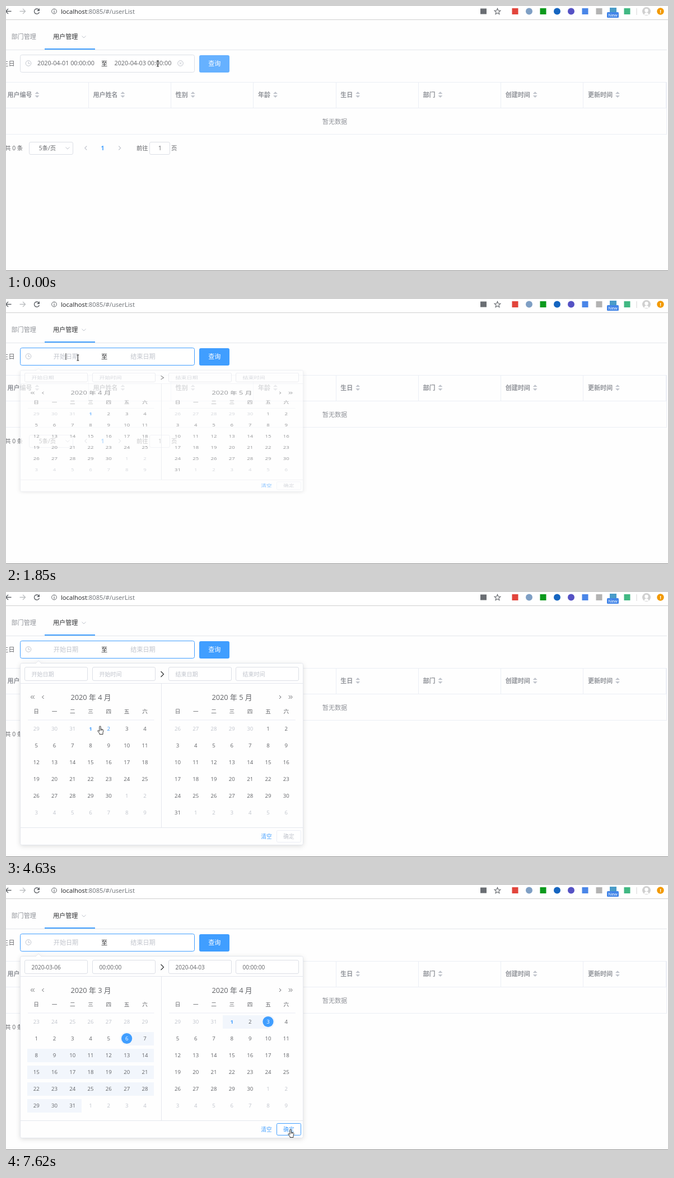
Animation, 1182 px wide and 474 px high, one loop 8 s. Source, as an HTML page:

```html
<!DOCTYPE html>
<html lang="zh-CN">
<head>
<meta charset="utf-8">
<title>用户管理</title>
<style>
  html, body { margin: 0; width: 100%; height: 100%; overflow: hidden; background: #fefefe; }
  svg { display: block; width: 1182px; height: 474px; }
  text { font-family: "Open Sans", "Noto Sans CJK SC", "Noto Sans CJK", sans-serif; white-space: pre; }
  .popup { filter: drop-shadow(0 2px 4px rgba(0, 0, 0, .12)); }
</style>
</head>
<body>
<svg viewBox="0 0 1182 474">
  <g id="page"></g>
  <g id="live"></g>
</svg>
<script>
const LOOP = 8000;
const BLUE = '#409eff', INK = '#303133', TEXT = '#606266', MUTED = '#909399',
      PALE = '#c0c4cc', EDGE = '#dcdfe6', LINE = '#ebeef5', RANGE = '#f2f6fc', WHITE = '#fefefe';

// Moments of user actions, ms
const CLEAR = 650, OPEN = 1700, PREV_MONTH = 5280, PICK_START = 6200, PICK_END = 7080;

// Screen refreshes: [first, last, count]
const runs = [[0, 0, 1], [120, 1050, 8], [1170, 1550, 4], [1700, 2120, 4], [2270, 2960, 6],
  [3080, 3200, 2], [3350, 4200, 7], [4630, 5450, 6], [5600, 5600, 1], [5750, 6690, 7],
  [6810, 6810, 1], [7080, 7620, 5]];
const refreshes = runs.flatMap(([a, b, n]) =>
  Array.from({ length: n }, (_, i) => n > 1 ? a + (b - a) * i / (n - 1) : a));

// Pointer path: [ms, x, y]
const path = [[0, 271, 103], [120, 285, 103], [380, 311, 103], [CLEAR, 311, 103], [1050, 235, 104],
  [1550, 153, 105], [1700, 130, 104], [2120, 125, 107], [2270, 135, 130], [2500, 185, 200],
  [2822, 250, 246], [2960, 276, 243], [3080, 281, 252], [3200, 270, 256], [3350, 262, 268],
  [3650, 235, 282], [3900, 195, 270], [4200, 168, 240], [4630, 168, 240], [5122, 66, 189],
  [5300, 66, 189], [5450, 81, 196], [5600, 100, 215], [5907, 180, 268], [6063, 214, 283],
  [6220, 215, 282], [6377, 300, 270], [6533, 400, 252], [6690, 461, 248], [6810, 468, 247],
  [7080, 468, 247], [7480, 504, 415], [7620, 508, 437]];

function pointerAt(t) {
  const i = path.findIndex(p => p[0] > t);
  if (i < 0) return path[path.length - 1].slice(1);
  if (i === 0) return path[0].slice(1);
  const [a, x, y] = path[i - 1], [b, u, v] = path[i], k = (t - a) / (b - a);
  return [x + (u - x) * k, y + (v - y) * k];
}

// Drawing helpers; text is placed by its vertical centre
const text = (x, y, s, size, fill, anchor = 'middle', weight = 400) =>
  `<text x="${x}" y="${y + size * .37}" font-size="${size}" fill="${fill}" text-anchor="${anchor}" font-weight="${weight}">${s}</text>`;
const label = (x, y, s, size, fill, weight) => text(x, y, s, size, fill, 'start', weight);
const rect = (x, y, w, h, fill, stroke = 'none', r = 0) =>
  `<rect x="${x}" y="${y}" width="${w}" height="${h}" rx="${r}" fill="${fill}" stroke="${stroke}"/>`;
const circle = (x, y, r, fill, stroke = 'none') =>
  `<circle cx="${x}" cy="${y}" r="${r}" fill="${fill}" stroke="${stroke}"/>`;
const stroke = (d, color, width = 1, fill = 'none') =>
  `<path d="${d}" fill="${fill}" stroke="${color}" stroke-width="${width}"/>`;
const chevron = (x, y, dir, color, size = 3, width = 1) =>
  stroke(`M${x - dir * size / 2} ${y - size}l${dir * size} ${size}l${-dir * size} ${size}`, color, width);
const chevronDown = (x, y) => stroke(`M${x - 3.5} ${y - 1.5}l3.5 3.5 3.5-3.5`, PALE);

function browserBar() {
  const badges = [[909, '#e2453c', 0], [934, '#7f9fc4', 1], [959, '#0b9a1c', 0], [984, '#1565c0', 1],
    [1009, '#5552c4', 1], [1034, '#4a86e8', 0], [1059, '#b3b3b3', 0], [1109, '#41b883', 0]];
  return rect(0, 0, 1182, 24, '#fff') + rect(0, 24, 1182, 1, '#d0d0d0') +
    stroke('M9.5 9.5H0M4 5L-.5 9.5L4 14', '#5f6368', 1.3) +
    stroke('M24.5 9.5H34M30 5l4.5 4.5L30 14', '#bcbec1', 1.3) +
    stroke('M58.5 6.5A4.6 4.6 0 1 0 59.4 11', '#5f6368', 1.4) +
    '<path d="M60 4v5h-5z" fill="#5f6368"/>' +
    circle(86, 9.5, 4.4, 'none', '#5f6368') + rect(85.4, 9, 1.2, 3.2, '#5f6368') + rect(85.4, 6.8, 1.2, 1.2, '#5f6368') +
    label(98, 9.5, 'localhost<tspan fill="#6b6f74">:8085/#/userList</tspan>', 11.2, '#202124') +
    rect(847, 4.5, 11, 10, '#6a6e73') +
    stroke('M877.5 4.5l1.5 3.5 3.9.3-3 2.5 1 3.8-3.4-2-3.4 2 1-3.8-3-2.5 3.9-.3z', '#5f6368', 1.1) +
    badges.map(([x, c, round]) => round ? circle(x, 9.5, 6, c) : rect(x - 5.5, 4, 11, 11, c)).join('') +
    rect(1078, 3, 12, 8, '#4a9cc8') + rect(1073, 11, 21, 10, '#4285e8', 'none', 1.5) +
    text(1083.5, 16, 'New', 8, '#fff') +
    rect(1125.5, 4, 1, 12, '#d5d5d5') +
    circle(1143.5, 9.5, 7.5, '#d0d0d0') + circle(1143.5, 8, 3.2, '#fff') +
    '<path d="M1139.5 16c0-6 8-6 8 0z" fill="#fff"/>' +
    circle(1168.5, 9.5, 6.2, '#f29900') + text(1168.5, 9.5, '!', 9.5, '#fff', 'middle', 700);
}

function table() {
  const names = ['用户编号', '用户姓名', '性别', '年龄', '生日', '部门', '创建时间', '更新时间'];
  const heads = names.map((name, i) => {
    const x = i ? 8.2 + i * 147.25 : 2.5, mid = x + name.length * 11 + 9;
    return label(x, 158.5, name, 11, MUTED, 700) +
      `<path d="M${mid - 4} 157.3l4-4 4 4zM${mid - 4} 160l4 4 4-4z" fill="${PALE}"/>` +
      rect(Math.floor(147.25 * (i + 1)), 136, 1, 46, LINE);
  }).join('');
  return [136, 182, 229].map(y => rect(0, y, 1180, 1, LINE)).join('') + heads +
    rect(1179, 136, 1, 94, LINE) + text(587, 206.5, '暂无数据', 11.1, MUTED);
}

function pagination() {
  return text(30, 254.5, '共 0 条', 10.3, TEXT, 'end') +
    rect(41.5, 243.5, 78, 22, '#fff', EDGE, 2.5) + text(74, 254.5, '5条/页', 10.3, TEXT) + chevronDown(110, 254) +
    chevron(142.5, 254, -1, PALE, 3.5, 1.1) + text(172.5, 254.5, '1', 10.3, BLUE, 'middle', 700) +
    chevron(203, 254, 1, PALE, 3.5, 1.1) + label(233, 254.5, '前往', 10.3, TEXT) +
    rect(256.5, 243.5, 36, 22, '#fff', EDGE, 2.5) + text(275, 254.5, '1', 10.3, TEXT) +
    label(295, 254.5, '页', 10.3, TEXT);
}

document.getElementById('page').innerHTML = browserBar() +
  label(9.5, 55, '部门管理', 11.1, MUTED) + label(84, 55, '用户管理', 11.1, INK) + chevronDown(139, 55) +
  rect(0, 78, 1180, 1, '#e4e6ea') + rect(69, 76, 90, 2, BLUE) +
  text(15.5, 103, '生日', 11.1, TEXT, 'end') +
  table() + pagination() + rect(0, 473, 1182, 1, '#8c8c8c');

// Calendar
const DAY = 864e5, CELL = 32.3, PANEL = 252.3, GRID_X = 38, GRID_Y = 229.5, ROW = 30;
const dayOf = (month, d) => Date.UTC(2020, month, d) / DAY;
const leftMonth = t => t < PREV_MONTH ? 3 : 2;
const TODAY = dayOf(3, 1), START = dayOf(2, 6), END = dayOf(3, 3);

function gridStart(month) {
  const first = dayOf(month, 1);
  return first - (new Date(first * DAY).getUTCDay() || 7);
}
const isIn = (day, month) => new Date(day * DAY).getUTCMonth() === month;

function dayUnder([x, y], t) {
  const panel = x < 278 ? 0 : 1;
  const col = Math.floor((x - GRID_X - panel * PANEL) / CELL), row = Math.floor((y - GRID_Y) / ROW);
  if (t < OPEN || col < 0 || col > 6 || row < 0 || row > 5) return null;
  const month = leftMonth(t) + panel, day = gridStart(month) + row * 7 + col;
  return { day, month, active: isIn(day, month) };
}

function panelView(index, month, sel, hover) {
  const x0 = GRID_X + index * PANEL + CELL / 2, first = gridStart(month);
  let bands = '', days = '';
  for (let i = 0; i < 42; i++) {
    const day = first + i, x = x0 + i % 7 * CELL, y = 244.5 + Math.floor(i / 7) * ROW;
    const active = isIn(day, month), num = new Date(day * DAY).getUTCDate();
    let color = active ? TEXT : PALE, weight = 400;
    if (active && sel && day >= sel[0] && day <= sel[1]) {
      const isStart = day === sel[0], isEnd = day === sel[1];
      const left = isStart ? x : x - CELL / 2, right = isEnd ? x : x + CELL / 2;
      bands += rect(left, y - 12, right - left, 24, RANGE);
      if (isStart || isEnd) {
        bands += circle(x, y, 12, RANGE);
        days += circle(x, y, 9.6, BLUE);
        color = '#fff';
      }
    }
    if (color === TEXT) {
      if (day === TODAY) [color, weight] = [BLUE, 700];
      else if (hover && hover.active && hover.month === month && hover.day === day) color = BLUE;
    }
    days += text(x, y, num, 9.6, color, 'middle', weight);
  }
  const week = [...'日一二三四五六'].map((s, i) => text(x0 + i * CELL, 213, s, 9.6, TEXT)).join('');
  return text(151.5 + index * 252, 188, `2020 年 ${month + 1} 月`, 12.8, TEXT) + week +
    rect(39 + index * PANEL, 228.5, 225.5, 1, LINE) + `<g shape-rendering="crispEdges">${bands}</g>` + days;
}

function popup(t, pointer) {
  const lagged = pointerAt(t - 100), hover = dayUnder(lagged, t), month = leftMonth(t);
  const picking = t >= PICK_START && t < PICK_END, done = t >= PICK_END;
  let sel = null;
  if (done) sel = [START, END];
  else if (picking) sel = [START, hover && hover.active ? Math.max(START, hover.day) : START];

  const values = done ? ['2020-03-06', '00:00:00', '2020-04-03', '00:00:00']
    : picking ? ['2020-03-06', '00:00:00', '2020-03-06', '00:00:00']
    : ['开始日期', '开始时间', '结束日期', '结束时间'];
  const fields = [33.5, 154.5, 290.5, 410.5].map((x, i) =>
    rect(x, 134.5, 112, 24, picking ? '#f3f6fb' : '#fff', picking ? '#e4e7ed' : EDGE, 2.5) +
    label(x + 12, 147, values[i], 10, done ? TEXT : PALE)).join('');

  const onPrev = t > 5000 && Math.abs(lagged[0] - 66) < 7 && Math.abs(lagged[1] - 188) < 7;
  const double = (x, dir) => chevron(x - 1.7, 188, dir, TEXT) + chevron(x + 1.7, 188, dir, TEXT);
  const onOk = done && pointer[0] > 483 && pointer[1] > 426;
  const okText = onOk ? BLUE : done ? TEXT : PALE, okEdge = onOk ? BLUE : done ? EDGE : LINE;

  const p = Math.min(1, (t - OPEN + 60) / 300);
  const grow = `opacity="${p}" transform="translate(0 ${128 * (1 - p)}) scale(1 ${p})"`;
  return `<g class="popup" ${grow}>` +
    rect(25.5, 127.5, 505, 325, WHITE, '#e4e7ed', 3) +
    stroke('M52.5 128l5.5-5 5.5 5', '#e4e7ed', 1, WHITE) + `</g><g ${grow}>` +
    fields + chevron(279, 147, 1, INK, 5, 1.2) +
    rect(26, 163, 504, 1, '#e4e7ed') + rect(277, 163, 1, 258, '#e4e7ed') + rect(26, 421, 504, 1, '#e4e7ed') +
    double(47.5, -1) + chevron(66, 188, -1, onPrev ? '#8fbcf5' : TEXT) +
    chevron(489.5, 188, 1, TEXT) + double(508, 1) +
    panelView(0, month, sel, hover) + panelView(1, month + 1, sel, hover) +
    text(465, 437, '清空', 9.7, BLUE) +
    rect(483.5, 426.5, 43, 21, '#fff', okEdge, 2) + text(505, 437, '确定', 9.7, okText) + '</g>';
}

function queryForm(t) {
  const filled = t < CLEAR, open = t >= OPEN;
  const caret = open && t < PREV_MONTH && (t - OPEN) % 1060 < 530;
  return rect(25.5, 87.5, 311, 31, '#fff', open ? BLUE : t < 120 ? EDGE : PALE, 3) +
    circle(40, 102.5, 4.8, 'none', PALE) + stroke('M40 99.5v3.5h2.8', PALE) +
    (filled
      ? label(56, 102.5, '2020-04-01 00:00:00', 10.8, TEXT) + label(193.5, 102.5, '2020-04-03 00:00:00', 10.8, TEXT) +
        circle(311.5, 102.5, 4.8, 'none', PALE) + stroke('M309.7 100.7l3.6 3.6m0-3.6l-3.6 3.6', PALE)
      : text(107, 102.5, '开始日期', 11.1, PALE) + text(244.5, 102.5, '结束日期', 11.1, PALE)) +
    text(175.5, 103, '至', 11.1, INK) +
    (caret ? rect(106.5, 97, 1, 12, INK) : '') +
    rect(345, 88, 54, 31, t < 120 ? '#66b1ff' : BLUE, 'none', 3) + text(372.3, 103, '查询', 11.1, '#fff');
}

function cursor([x, y], t) {
  const within = (l, top, r, b) => x >= l && x <= r && y >= top && y <= b;
  const onClear = t < CLEAR + 60 && within(305, 96, 318, 109);
  const hand = onClear || dayUnder([x, y], t) || within(60, 182, 72, 195) && t > OPEN || within(483, 426, 527, 448);
  let shape;
  if (hand) shape = stroke('M-1.2 1C-1.2-.4 1.2-.4 1.2 1V5L4.6 6C5.8 6.4 6.1 7 5.9 8.2L5 11.5V14.5H-1V13L-4 9C-4.8 7.8-3.4 7-2.4 8L-1.2 9.3ZM1.2 5V8M3.4 5.8V8', '#222', .9, '#fff');
  else if (within(25, 88, 337, 119) && !within(168, 88, 184, 119))
    shape = stroke('M-2-5H2M0-5V5M-2 5H2', '#222');
  else shape = stroke('M.3.3V10.8L2.7 8.6 4.3 12.2 6 11.4 4.4 8H7.4Z', '#222', .9, '#fff');
  return `<g transform="translate(${x} ${y})">${shape}</g>`;
}

const live = document.getElementById('live');
const began = performance.now();
let shown = -1;

function frame() {
  const now = (performance.now() - began) % LOOP;
  const t = refreshes.filter(r => r <= now + .5).pop();
  if (t !== shown) {
    shown = t;
    const pointer = pointerAt(t);
    live.innerHTML = queryForm(t) + (t >= OPEN ? popup(t, pointer) : '') + cursor(pointer, t);
  }
  requestAnimationFrame(frame);
}
frame();
</script>
</body>
</html>
```
